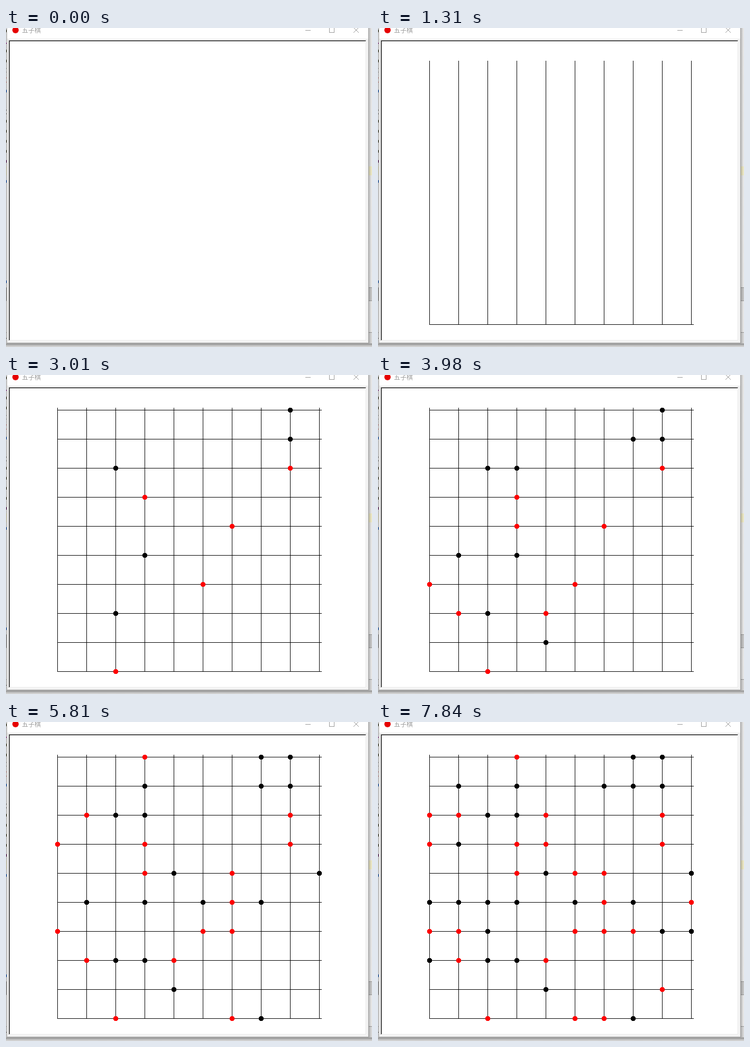
An HTML page that plays this animation: 692x604 px, repeating every 8 s.

```html
<!DOCTYPE html>
<html lang="zh">
<head>
<meta charset="utf-8">
<title>五子棋</title>
<style>
  html, body { margin: 0; width: 100%; height: 100%; overflow: hidden; background: #f0f0f0; }
  svg { display: block; }
  text { font: 12px "Noto Sans CJK SC", "Noto Sans CJK", "Noto Sans", sans-serif; }
</style>
</head>
<body>
<svg id="stage" width="692" height="604" viewBox="0 0 692 604" shape-rendering="crispEdges">
  <defs>
    <linearGradient id="side"><stop stop-color="#000" stop-opacity=".24"/><stop offset="1" stop-color="#000" stop-opacity=".03"/></linearGradient>
    <linearGradient id="below" x2="0" y2="1"><stop stop-color="#000" stop-opacity=".32"/><stop offset="1" stop-color="#000" stop-opacity=".06"/></linearGradient>
  </defs>

  <!-- Editor behind the window -->
  <rect width="692" height="604" fill="#f5f5f5"/>
  <rect y="262" width="692" height="17" fill="#fbf6cf"/>
  <rect y="491" width="692" height="26" fill="#d2d2d2"/>
  <path d="M0 491.5H692M0 516.5H692M0 576.5H692" stroke="#a0a0a0"/>
  <rect y="577" width="692" height="27" fill="#e6e6e6"/>
  <g id="marks"></g>
  <rect width="2" height="597" fill="#000" opacity=".1"/>
  <rect x="686" width="6" height="597" fill="url(#side)"/>
  <rect y="597" width="692" height="7" fill="url(#below)"/>
  <path d="M0 599.5H692" stroke="#999"/>

  <!-- Window frame -->
  <rect x="1" y="-1" width="685" height="598" fill="#9b9b9b"/>
  <rect x="2" width="683" height="596" fill="#f0f0f0"/>
  <rect x="2" width="683" height="20" fill="#fff"/>
  <rect x="5" y="23" width="677" height="570" fill="#fff"/>
  <path d="M5.5 592V23.5H681" fill="none" stroke="#a0a0a0"/>
  <path d="M6.5 591V24.5H680" fill="none" stroke="#000"/>
  <path d="M680.5 25V591.5H7" fill="none" stroke="#e3e3e3"/>
  <circle cx="18" cy="4" r="6" fill="#e60000" shape-rendering="auto"/>
  <text x="30" y="9" fill="#999">五子棋</text>
  <path d="M566 4.5H576M611.5 -.5H620.5V8.5H611.5Z" fill="none" stroke="#999"/>
  <path d="M657 -1L667 9M667 -1L657 9" stroke="#999" shape-rendering="auto"/>

  <g id="board"></g>
  <path id="pointer" d="M.5 .5V16.5L4.5 12.5L7 18.5L9.5 17.5L7 11.5H11.5Z" fill="#fff" stroke="#000" visibility="hidden"/>
</svg>
<script>
const DURATION = 8000, CELL = 55, LEFT = 97, TOP = 66, LENGTH = 500;
const FIRST_LINE = 588, LINE_GAP = 72;

// Moves as column and row digits; black plays first.
const MOVES = ("80 56 22 29 27 64 35 82 81 33 32 47 48 34 71 17 15 06 " +
  "44 66 37 65 70 30 79 69 31 12 55 03 75 83 94 95 26 59 " +
  "86 88 07 02 13 43 25 54 96 42 11 16 05 76 61").split(" ");

// [move number, time]; moves in between are evenly spaced.
const PACE = [[1, 1980], [2, 2090], [7, 2710], [8, 2780], [17, 3810], [18, 3980],
  [26, 4950], [27, 5100], [36, 6120], [37, 6200], [40, 6590], [45, 7150], [46, 7300], [51, 7840]];

const board = document.getElementById("board");
const pointer = document.getElementById("pointer");
const parts = [];

function add(parent, name, attributes) {
  const node = document.createElementNS("http://www.w3.org/2000/svg", name);
  for (const key in attributes) node.setAttribute(key, attributes[key]);
  return parent.appendChild(node);
}

function addPart(at, name, attributes) {
  parts.push({ at, node: add(board, name, attributes) });
}

function moveTime(number) {
  const i = Math.max(1, PACE.findIndex(([n]) => n >= number));
  const [n0, t0] = PACE[i - 1], [n1, t1] = PACE[i];
  return t0 + (t1 - t0) * (number - n0) / (n1 - n0);
}

function addMarks(color, height, ys) {
  const marks = document.getElementById("marks");
  for (const y of ys) add(marks, "rect", { y, width: 2, height, fill: color });
}

addMarks("#33331a", 5, [3, 41, 60, 174, 193, 212, 231]);
addMarks("#900090", 2, [28]);
addMarks("#500050", 5, [250]);
addMarks("#e04040", 1, [94, 102]);
addMarks("#888", 1, [76, 83]);
addMarks("#0050c0", 5, [117, 288, 478]);
addMarks("#222", 1, [155, 162, 587]);
addMarks("#888", 24, [492]);

for (let i = 0; i < 10; i++) {
  const at = FIRST_LINE + i * LINE_GAP;
  addPart(at, "rect", { x: LEFT + i * CELL, y: TOP - 4, width: 1, height: LENGTH });
  addPart(at + 10 * LINE_GAP, "rect", { x: LEFT, y: TOP + (9 - i) * CELL, width: LENGTH, height: 1 });
}

MOVES.forEach(([column, row], i) => addPart(moveTime(i + 1), "circle", {
  cx: LEFT + column * CELL + .5, cy: TOP + row * CELL + .5, r: 4.6, fill: i % 2 ? "#f00" : "#000"
}));

function show(node, visible) {
  node.setAttribute("visibility", visible ? "visible" : "hidden");
}

function draw(now) {
  const time = now % DURATION;
  for (const { at, node } of parts) show(node, time >= at);
  show(pointer, time >= 130 && time < 290);
  pointer.setAttribute("transform", time < 210 ? "translate(628 576)" : "translate(653 588)");
}

const start = performance.now();
function tick() {
  draw(performance.now() - start);
  requestAnimationFrame(tick);
}
tick();
</script>
</body>
</html>
```
